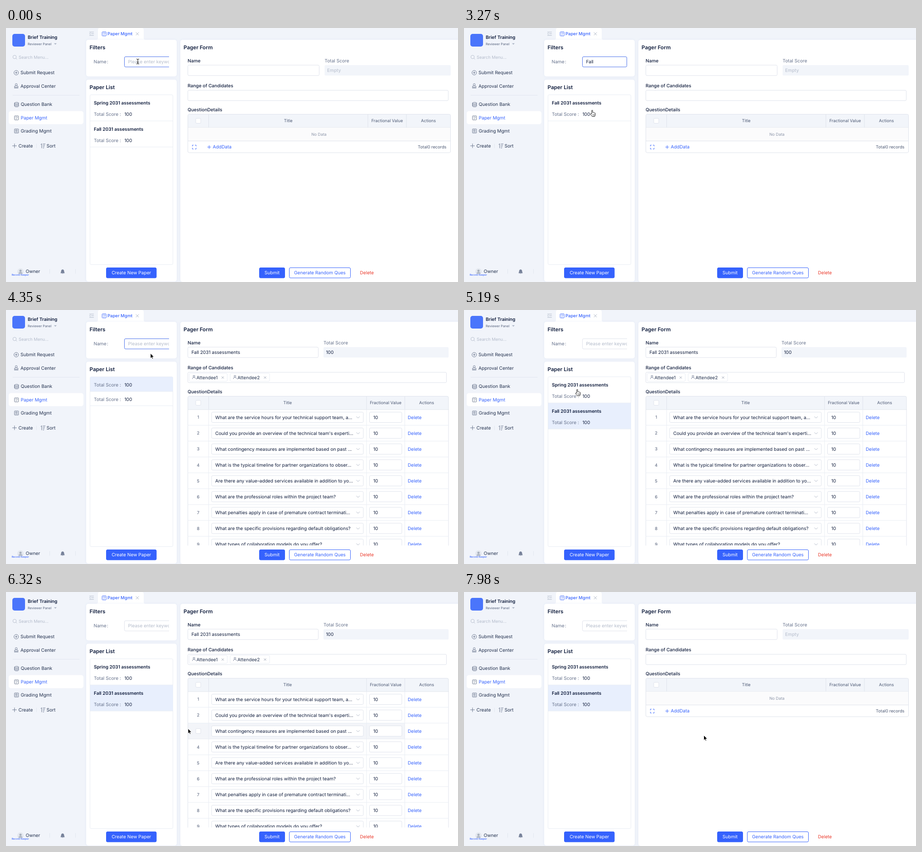
These frames come from a looping animation (998x561 px, 8 s). An HTML page:

```html
<!DOCTYPE html>
<html lang="en">
<head>
<meta charset="utf-8">
<title>Paper management</title>
<style>
  html, body { margin: 0; width: 100%; height: 100%; overflow: hidden; background: #f1f4fa; }
  svg { display: block; width: 100vw; height: 100vh; }
  text { font-family: Inter, Roboto, sans-serif; white-space: pre; text-rendering: geometricPrecision; }
  .edge { stroke: var(--edge); }
</style>
</head>
<body>
<svg id="stage" viewBox="0 0 998 561" xmlns="http://www.w3.org/2000/svg"></svg>
<script>
const LOOP = 8000;
const INK = '#101d3d', MENU = '#24324f', GREY = '#66728c', PALE = '#b4bccb';
const BLUE = '#3562fd', LINE = '#dfe3ec', SOFT = '#e9edf4', HEAD = '#f2f5fa';
const BODY = 10.13, SMALL = 9.25, TITLE = 11.6;

// y is the middle of the capitals
const text = (x, y, s, fill = INK, size = BODY, weight = 400, anchor = 'start') =>
  `<text x="${x}" y="${(y + size * 0.36).toFixed(2)}" fill="${fill}" font-size="${size}" font-weight="${weight}" text-anchor="${anchor}">${s}</text>`;
const mid = (x, y, s, fill, size, weight) => text(x, y, s, fill, size, weight, 'middle');
const box = (x, y, w, h, fill = 'none', stroke = 'none', r = 0, extra = '') =>
  `<rect x="${x}" y="${y}" width="${w}" height="${h}" rx="${r}" fill="${fill}" stroke="${stroke}" ${extra}/>`;
const path = (d, stroke, width = 0.9, fill = 'none') =>
  `<path d="${d}" fill="${fill}" stroke="${stroke}" stroke-width="${width}" stroke-linecap="round" stroke-linejoin="round"/>`;
const line = (x1, y1, x2, y2, color = SOFT) => path(`M${x1} ${y1}L${x2} ${y2}`, color, 1);
const ring = (x, y, r, color) => `<circle cx="${x}" cy="${y}" r="${r}" fill="none" stroke="${color}" stroke-width=".9"/>`;
const cross = (x, y, r, color) => path(`M${x - r} ${y - r}l${2 * r} ${2 * r}m0 ${-2 * r}l${-2 * r} ${2 * r}`, color, 0.8);
const plus = (x, y, r, color) => path(`M${x - r} ${y}h${2 * r}M${x} ${y - r}v${2 * r}`, color);
const check = (x, y) => box(x - 5.5, y - 5.5, 11, 11, '#fff', LINE, 2);
const field = (x, y, w, h = 23) => box(x, y, w, h, '#fff', LINE, 2.5);
const group = (id, inner, extra = '') => `<g id="${id}" ${extra}>${inner}</g>`;

function paperIcon(x, y, color) {
  return box(x - 4.5, y - 4.5, 9, 9, 'none', color, 1.2, 'stroke-width=".9"') +
    path(`M${x - 2.3} ${y - 1.8}h4.6M${x - 2} ${y + 1.2}l1.4 1.3l2.6 -2.6`, color, 0.8);
}

function sidebar() {
  const icon = '#5f6b85', rule = '#e1e6ef';
  return box(14, 13, 28, 28, '#4a75fb', 'none', 5) +
    text(48, 20.5, 'Brief Training', INK, 10.05, 600) +
    text(48, 35, 'Reviewer Panel', '#54617c', 7.25) +
    path('M106 33.7h6l-3 3z', 'none', 0, '#a8b1c2') +
    ring(19, 64, 3.8, PALE) + path('M22 67l2 2', PALE) +
    text(28, 64.5, 'Search Menu...', PALE, SMALL) +
    ring(22.6, 98.8, 5, icon) + plus(22.6, 98.8, 2.3, icon) +
    text(32, 98.8, 'Submit Request', MENU) +
    path('M21.3 127.5c.4 -1.5 -1.2 -2 -.9 -3.3c.5 -1.8 3.9 -1.8 4.4 0c.3 1.3 -1.3 1.8 -.9 3.3M18.4 130.4q0 -2.7 2.3 -2.8h3.8q2.3 .1 2.3 2.8zM18.4 132.6h8.4', icon) +
    text(32, 128, 'Approval Center', MENU) +
    line(15, 148.5, 162, 148.5, rule) +
    path('M18.6 165.8c0 -2.2 9.2 -2.2 9.2 0v6.8c0 2.2 -9.2 2.2 -9.2 0zc0 2 9.2 2 9.2 0M18.6 168.2c0 2 9.2 2 9.2 0M18.6 170.6c0 2 9.2 2 9.2 0', icon) +
    text(32.5, 168.8, 'Question Bank', MENU) +
    box(6, 183.5, 165, 29, '#fff', 'none', 5) +
    paperIcon(23.2, 198.5, icon) + text(32.5, 198, 'Paper Mgmt', BLUE) +
    box(18.7, 223, 9, 9, 'none', icon, 1, 'stroke-width=".9"') +
    path('M21.5 225.2h3.4v2.2h-3.4zM20.8 229.7h4.8', icon, 0.8) +
    text(32.5, 227.3, 'Grading Mgmt', MENU) +
    plus(18.8, 260.2, 4.5, icon) + text(27.5, 260, 'Create', MENU) +
    line(67.5, 256, 67.5, 265, rule) +
    path('M78.8 265v-9.5l-1.8 2M81.8 256h4.8M81.8 259h3.8M81.8 262h2.8M81.8 265h1.8', icon) +
    text(89.5, 260, 'Sort', MENU) +
    '<circle cx="32" cy="538" r="7.2" fill="#e4e8ef"/><circle cx="32" cy="536.3" r="2.5" fill="#a9b1be"/>' +
    path('M27.6 542.6q0 -3.4 4.4 -3.4t4.4 3.4z', 'none', 0, '#a9b1be') +
    text(43.5, 537.8, 'Owner', MENU) +
    mid(31.5, 544.6, 'Record Keeper', BLUE, 5.4, 500) +
    line(96.5, 533, 96.5, 542, rule) + line(153.5, 533, 153.5, 542, rule) +
    path('M121 541v-.7q1 -.8 1 -3.6q.2 -2.8 3 -3.1q2.8 .3 3 3.1q0 2.8 1 3.6v.7zM124 542.4h2', '#77829a', 0.6, '#77829a');
}

function tabs() {
  return path('M184.5 9h9M188.5 12.6h5M184.5 16.4h9M186.6 11l-2 1.7l2 1.7', '#aab3c3') +
    path('M199 26q4 0 4 -4V4q0 -4 4 -4h93q4 0 4 4v18q0 4 4 4z', 'none', 0, '#fff') +
    paperIcon(216.7, 13, BLUE) + text(224, 13, 'Paper Mgmt', BLUE, 9.5, 500) +
    cross(290, 12.8, 3, '#9aa4b6');
}

function button(x, w, label, solid) {
  return box(x + 0.5, 529.5, w - 1, 22.5, solid ? BLUE : '#fff', BLUE, 2.5) +
    mid(x + w / 2, 540.8, label, solid ? '#fff' : BLUE);
}

const names = ['Spring 2031 assessments', 'Fall 2031 assessments'];
const score = y => text(194, y, 'Total Score :', GREY) + text(261.5, y + 0.4, '100');
const item = (y, name) => text(194, y + 17.3, name, INK, 10.05, 600) + score(y + 42.3) + line(185.5, y + 57.2, 368.5, y + 57.2);
const shortItem = (y, end) => score(y + 17) + line(185.5, end, 368.5, end);

function leftPanels() {
  return box(177, 26, 200, 81, '#fff', 'none', 5, 'filter="url(#shade)"') +
    text(184.5, 43, 'Filters', INK, TITLE, 600) +
    text(193.5, 74.5, 'Name', GREY) + text(222.8, 74.5, ':', GREY) +
    group('filter', box(261.5, 63.5, 120, 22.5, '#fff', 'none', 2.5, 'class="edge"') +
      text(269.5, 74.5, 'Please enter keywords', PALE), 'clip-path="url(#cut)"') +
    group('typed', box(261.5, 63.5, 98, 22.5, '#fff', 'none', 2.5, 'class="edge"') +
      text(269.5, 74.5, names[1].split(' ')[0])) +
    box(0, 67.5, 1, 13.5, INK, 'none', 0, 'id="caret"') +
    box(177, 114, 200, 446, '#fff', 'none', 5, 'filter="url(#shade)"') +
    text(184.5, 131, 'Paper List', INK, TITLE, 600) +
    box(185.5, 147.5, 183, 375, '#fff', SOFT, 2.5) +
    box(186, 148, 182.5, 57, '#e8effd', 'none', 0, 'id="mark"') +
    group('both', item(148, names[0]) + item(205.7, names[1])) +
    group('one', item(148, names[1])) +
    group('shortOne', shortItem(148, 180)) +
    group('shortBoth', shortItem(148, 180) + shortItem(180, 211.5)) +
    box(219.5, 527.5, 114, 26.5, 'none', BLUE, 4, 'id="wave" stroke-width="3"') +
    button(221, 111.5, 'Create New Paper', true);
}

// Parts of the form shared by both states; cols are the table column edges
function formBase(nameEnd, scoreX, rangeEnd, cols, bottom) {
  const [left, a, b, c, end] = cols;
  return field(left, 82, nameEnd - left) + text(scoreX, 72, 'Total Score', GREY) +
    box(scoreX, 82, end - scoreX + 0.3, 23, HEAD, 'none', 2.5) +
    field(left, 137.5, rangeEnd - left) +
    path(`M${left} 219.5V193.5q0 -3 3 -3H${end - 3}q3 0 3 3v26z`, LINE, 1, HEAD) +
    [a, b, c].map(x => line(x, 190.5, x, 219.5, LINE)).join('') + check(424.5, 205) +
    mid((a + b) / 2, 205, 'Title', '#4b5873', SMALL) +
    mid((b + c) / 2, 205, 'Fractional Value', '#4b5873', SMALL) +
    mid((c + end) / 2, 205, 'Actions', '#4b5873', SMALL) +
    path(`M${left} 219.5V${bottom}M${end} 219.5V${bottom}`, LINE, 1);
}

function emptyForm() {
  return formBase(691.5, 703.5, 976.5, [401.5, 447.5, 799, 884, 981.5], 273) +
    text(709, 93.8, 'Empty', PALE) +
    box(402, 220, 579, 29.5, '#fbfbfc') + mid(691, 234.5, 'No Data', '#8b95a8', 8.8) +
    line(401.5, 249.5, 981.5, 249.5, LINE) +
    path('M401.5 272.5q0 3 3 3H978.5q3 0 3 -3', LINE, 1) +
    path('M411.5 261v-2.3h2.3M417.5 258.7h2.3v2.3M419.8 265v2.3h-2.3M413.8 267.3h-2.3v-2.3', BLUE) +
    plus(448.5, 263, 3.6, BLUE) + text(456.5, 262.7, 'AddData', BLUE) +
    text(972.5, 262.8, 'Total0 records', '#4b5873', SMALL, 400, 'end');
}

const questions = [
  'What are the service hours for your technical support team, a...',
  'Could you provide an overview of the technical team\'s experti...',
  'What contingency measures are implemented based on past ...',
  'What is the typical timeline for partner organizations to obser...',
  'Are there any value–added services available in addition to yo...',
  'What are the professional roles within the project team?',
  'What penalties apply in case of premature contract terminati...',
  'What are the specific provisions regarding default obligations?',
  'What types of collaboration models do you offer?'
];
const ROW = 35.05, TOP = 219.5;

function tag(x, w, name) {
  return box(x + 0.5, 140, w, 17.5, '#fff', SOFT, 2) +
    ring(x + 11, 146.3, 1.9, GREY) + path(`M${x + 7.5} 152q0 -3.3 3.5 -3.3t3.5 3.3`, GREY, 0.8) +
    text(x + 16.5, 149.2, name, MENU) + cross(x + w - 9.5, 149.2, 2.2, '#8b95a8');
}

function row(q, i) {
  const y = TOP + ROW * (i + 0.5);
  return group('num' + i, mid(424.3, y, i + 1, '#4b5873', SMALL)) +
    group('tick' + i, check(424.5, y)) +
    field(454, y - 11.5, 335) + text(462, y, q) +
    path(`M774 ${y - 1.5}l3.3 3.3l3.3 -3.3`, '#a5aebf') +
    field(802.5, y - 11.5, 71.5) + text(811, y, '10') + text(887, y, 'Delete', BLUE) +
    line(401.5, y + ROW / 2, 977, y + ROW / 2);
}

function fullForm() {
  const cols = [401.5, 447.5, 796, 880.5, 977];
  return formBase(689.5, 701, 972.5, cols, 520) +
    text(409.5, 93.8, names[1]) + text(706.5, 93.4, '100') +
    tag(404, 84, 'Attendee1') + tag(494.5, 87, 'Attendee2') +
    group('rows', box(402, 0, 478.5, ROW, '#f3f5f9', 'none', 0, 'id="hover"') +
      questions.map(row).join('') + cols.slice(1, 4).map(x => line(x, TOP, x, 520)).join(''), 'clip-path="url(#scroll)"');
}

function form() {
  return box(385, 26, 620, 535, '#fff', 'none', 5, 'filter="url(#shade)"') +
    text(392, 43, 'Pager Form', INK, TITLE, 600) +
    text(401, 72, 'Name', INK, BODY, 500) +
    text(401, 127.5, 'Range of Candidates', INK, BODY, 500) +
    text(401, 180, 'QuestionDetails', INK, BODY, 500) +
    group('empty', emptyForm()) + group('full', fullForm()) +
    button(559, 57, 'Submit', true) + button(625, 136, 'Generate Random Ques') +
    text(781.5, 540.8, 'Delete', '#ea3a2c');
}

function cursors() {
  const beam = 'M-2.5 -5.5Q0 -5.5 0 -4Q0 -5.5 2.5 -5.5M0 -4V4M-2.5 5.5Q0 5.5 0 4Q0 5.5 2.5 5.5M-1.2 1.5H1.2';
  return group('arrow', path('M0 0V10.6L2.5 8.4L4.1 12L5.8 11.2L4.2 7.7H7.5Z', '#fff', 0.8, '#000')) +
    group('beam', path(beam, '#fff', 2.2) + path(beam, '#000', 1)) +
    group('hand', path('M-1.1 8V1.1Q-1.1 0 0 0T1.1 1.1V5.2Q2.9 4.3 3.3 5.6Q5 4.9 5.3 6.2Q6.8 5.7 6.8 7.4V9.5Q6.8 12 5.5 14H0Q-2 11.6 -3.6 9Q-4 7.2 -2.3 7.7Z', '#111', 0.95, '#fff') +
      path('M1.4 9.2v2.6M3.2 9.2v2.6M5 9.2v2.6', '#111', 0.6));
}

const stage = document.getElementById('stage');
stage.innerHTML =
  `<defs><clipPath id="cut">${box(260, 60, 100, 30)}</clipPath><clipPath id="scroll">${box(400, TOP, 600, 520 - TOP)}</clipPath>
  <filter id="shade" x="-10%" y="-10%" width="120%" height="120%"><feDropShadow dx="0" dy="0" stdDeviation="2.5" flood-color="#8fa8dd" flood-opacity=".16"/></filter></defs>` +
  sidebar() + tabs() + leftPanels() + form() + cursors();

const $ = id => document.getElementById(id);
const show = (id, on) => $(id).setAttribute('display', on ? 'inline' : 'none');
const set = (id, attrs) => { for (const k in attrs) $(id).setAttribute(k, attrs[k]); };
const within = (t, a, b) => t >= a && t < b;

// Pointer stops: time, x, y
const stops = [
  [0, 291, 74], [160, 291, 74], [260, 380, 96], [750, 380, 96], [1260, 294, 75], [2300, 294, 75],
  [2340, 300, 74], [2860, 300, 74], [3270, 283, 181.5], [3400, 283, 181.5], [3720, 300, 79], [4120, 300, 79],
  [4350, 319, 96], [4690, 262, 228], [4860, 262, 228], [5190, 250, 175.5], [5600, 250, 175.5], [5710, 247, 236],
  [5960, 247, 236], [6320, 402, 302], [6420, 425, 312], [6750, 302, 194], [6770, 302, 194], [7210, 265, 533],
  [7420, 265, 533], [7980, 529.5, 316.8], [LOOP, 529.5, 316.8]
];

function pointer(t) {
  const i = stops.findIndex((s, n) => n && t <= s[0]);
  const [t0, x0, y0] = stops[i - 1], [t1, x1, y1] = stops[i];
  const p = (t - t0) / (t1 - t0), e = p * p * (3 - 2 * p);
  return [x0 + (x1 - x0) * e, y0 + (y1 - y0) * e];
}

function render(t) {
  const [x, y] = pointer(t);
  const inArea = (l, top, r, b) => x >= l && x <= r && y >= top && y <= b;

  // Filter field
  const typed = within(t, 2030, 3920);
  const overField = inArea(261, 63, 360, 86);
  const focused = within(t, 1730, 3390) || within(t, 3890, 4840);
  stage.style.setProperty('--edge', overField || focused ? '#4b71ea' : LINE);
  show('filter', !typed);
  show('typed', typed);
  show('caret', within(t, 1730, 2560));
  set('caret', { x: t < 2030 ? 269.5 : 289 });

  // Paper list
  const list = t < 2600 ? 'both' : t < 2640 ? 'shortOne' : t < 4340 ? 'one' : t < 4370 ? 'shortBoth' : 'both';
  for (const id of ['both', 'one', 'shortOne', 'shortBoth']) show(id, id === list);
  const second = within(t, 4840, 5410) || t >= 5960;
  show('mark', t >= 3390);
  set('mark', { y: second ? 205.5 : 148, height: list === 'shortBoth' ? 32 : 57.2 });

  // Form and hovered row
  const full = within(t, 3390, 5410) || within(t, 5960, 7400);
  show('full', full);
  show('empty', !full);
  const hot = full && inArea(401, TOP, 977, 520) ? Math.floor((y - TOP) / ROW) : -1;
  show('hover', hot >= 0);
  set('hover', { y: TOP + ROW * Math.max(hot, 0) });
  questions.forEach((_, i) => { show('num' + i, i !== hot); show('tick' + i, i === hot); });

  // Button press
  const press = (t - 7400) / 400;
  set('wave', { opacity: press >= 0 && press < 1 ? 0.25 * (1 - press) : 0 });

  // Pointer shape
  const listEnd = list === 'one' ? 205 : 262;
  const overLink = inArea(186, 148, 368, listEnd) || inArea(221, 529, 332, 552);
  const shape = overField ? 'beam' : overLink ? 'hand' : 'arrow';
  for (const id of ['arrow', 'beam', 'hand']) show(id, id === shape);
  set(shape, { transform: `translate(${x.toFixed(2)} ${y.toFixed(2)})` });
}

const start = performance.now();
function tick() {
  render((performance.now() - start) % LOOP);
  requestAnimationFrame(tick);
}
tick();
</script>
</body>
</html>
```
